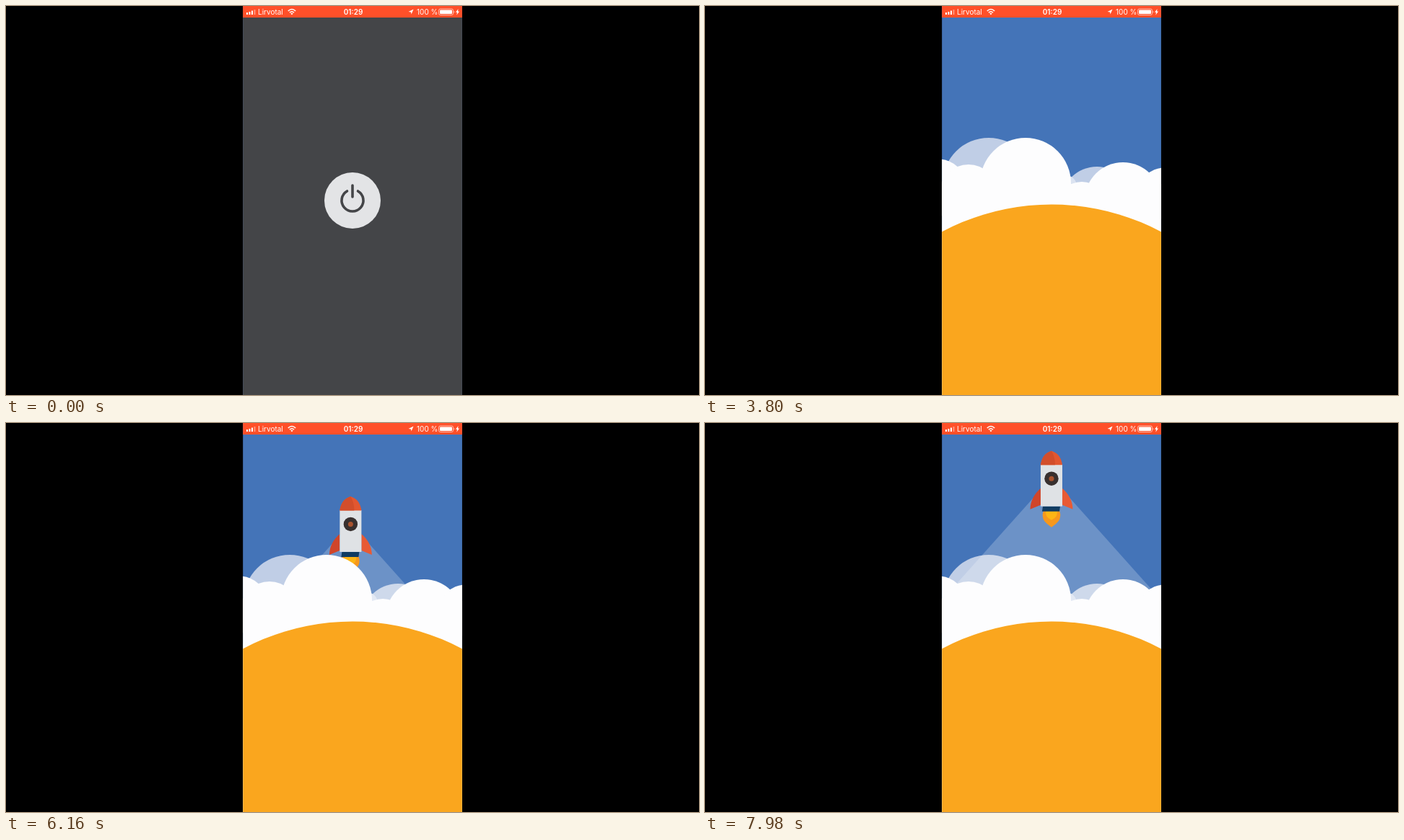
Recreate the animation shown at these times as an HTML page. Size 960x540 px, loop 8000 ms.

```html
<!DOCTYPE html>
<html lang="en">
<head>
<meta charset="utf-8">
<title>Rocket launch</title>
<style>
  html, body { margin: 0; width: 100%; height: 100%; overflow: hidden; background: #000; }
  svg { display: block; width: 100vw; height: 100vh; }
  text { font: 10px Inter, "Liberation Sans", sans-serif; fill: #fff; }
  .bold { font-weight: 600; }
</style>
</head>
<body>
<svg viewBox="0 0 960 540">
  <defs>
    <clipPath id="screen"><rect x="328.200" width="303.700" height="540"/></clipPath>
  </defs>
  <rect width="960" height="540"/>
  <g clip-path="url(#screen)">
    <rect x="328" width="304" height="540" fill="#4474b8"/>
    <rect id="night" x="328" width="304" height="540" fill="#444548"/>

    <g id="backClouds">
      <g fill="#c0cee6"><circle cx="393" cy="247" r="64"/><circle cx="543" cy="273" r="50"/></g>
      <circle cx="500" cy="250" r="15" fill="#dbe3f1"/>
    </g>

    <g id="rocket">
      <path d="M0 37L448 539H-448Z" fill="#fff" opacity=".21"/>
      <path d="M-11 83Q-14 91 -10 97Q-7 101 0 106Q7 101 10 97Q14 91 11 83Z" fill="#f7981d"/>
      <path d="M-8 83Q-9 92 0 96Q9 92 8 83Z" fill="#fdb515"/>
      <path d="M-12 77H12L11 84H-13Z" fill="#103c62"/>
      <path d="M-15 52Q-29 64 -29.500 81L-15 75Z" fill="#d0452a"/>
      <path d="M15 52Q29 64 29.500 81L15 75Z" fill="#e85a34"/>
      <rect x="-15" y="19" width="30" height="58" fill="#dfe2e5"/>
      <path d="M-15 19.500Q-13 4 0 0Q13 4 15 19.500Z" fill="#e25730"/>
      <path d="M-15 19.500Q-13 4 0 0Q5 8 5 19.500Z" fill="#d24e2b"/>
      <circle cy="38.500" r="9.700" fill="#38302f"/>
      <circle cy="38.500" r="3.500" fill="#a9532f"/>
    </g>

    <g id="frontClouds" fill="#fdfdfe">
      <circle cx="323" cy="252" r="39.500"/>
      <circle cx="365" cy="260" r="40"/>
      <circle cx="444" cy="246" r="63"/>
      <circle cx="522" cy="278" r="34"/>
      <circle cx="579" cy="270" r="53"/>
      <circle cx="636" cy="260" r="35.500"/>
      <rect x="328" y="247" width="304" height="293"/>
    </g>
    <circle id="hill" cx="480" cy="598.500" r="323" fill="#faa61e"/>

    <g id="button">
      <circle r="39" fill="#e3e4e6"/>
      <path d="M-7.500 -13A15 15 0 1 0 7.500 -13M0 -21V-5" fill="none" stroke="#444548" stroke-width="3.600" stroke-linecap="round"/>
    </g>

    <rect x="328" width="304" height="16" fill="#ff5029"/>
    <g fill="#fff">
      <path d="M333 9h2v3h-2zM336.500 8h2v4h-2zM340 6.500h2v5.500h-2z"/>
      <path d="M343.500 5h2v7h-2z" opacity=".4"/>
      <text x="349" y="12">Lirvotal</text>
      <path d="M390.800 7Q396 2 401.200 7M393 9.200Q396 6.300 399 9.200" fill="none" stroke="#fff" stroke-width="1.600"/>
      <path d="M394.300 10.500Q396 9 397.700 10.500L396 12.300Z"/>
      <text class="bold" x="481" y="12" text-anchor="middle">01:29</text>
      <path d="M557.500 8L564.500 4.500L561.500 11.500L561 8.500Z"/>
      <text x="569" y="12">100 %</text>
      <rect x="599.500" y="4" width="20" height="8.500" rx="2.200" fill="none" stroke="#fff" stroke-opacity=".6"/>
      <rect x="601" y="5.500" width="17" height="5.500" rx="1"/>
      <path d="M620.700 6.700q1.600 1.500 0 3zM626.500 4L623 8.800H625L624.300 12.500L628 7.500H626Z"/>
    </g>
  </g>
</svg>
<script>
  const LOOP = 8000;
  const part = id => document.getElementById(id);
  const progress = (t, from, to) => Math.min(1, Math.max(0, (t - from) / (to - from)));
  const easeOut = p => 1 - (1 - p) ** 3;
  const place = (id, x, y, scale = 1) =>
    part(id).setAttribute("transform", `translate(${x} ${y}) scale(${scale})`);
  const fade = (id, value) => part(id).setAttribute("opacity", value);

  // Time in ms and height of the rocket's nose
  const climb = [[3400, 232], [4940, 161.5], [6160, 102], [6900, 67], [7980, 38.7], [8600, 31]];

  function slope(i) {
    const a = climb[Math.max(0, i - 1)], b = climb[Math.min(climb.length - 1, i + 1)];
    return (b[1] - a[1]) / (b[0] - a[0]);
  }

  function noseAt(t) {
    const i = Math.max(0, climb.findIndex(k => k[0] > t) - 1);
    const [t0, y0] = climb[i], [t1, y1] = climb[i + 1];
    const span = t1 - t0, p = progress(t, t0, t1), q = 1 - p;
    return q * q * (1 + 2 * p) * y0 + p * p * (3 - 2 * p) * y1
      + span * p * q * (q * slope(i) - p * slope(i + 1));
  }

  function draw(t) {
    fade("night", 1 - progress(t, 1150, 1500));
    const press = progress(t, 1100, 1350);
    place("button", 480, 270, 1 - press);
    fade("button", 1 - press);

    place("hill", 0, 270 * (1 - easeOut(progress(t, 1150, 1620))));
    place("frontClouds", 0, 360 * (1 - easeOut(progress(t, 1300, 2000))));
    place("backClouds", 0, 360 * (1 - easeOut(progress(t, 1400, 2200))));

    const nose = noseAt(t);
    place("rocket", 480 - (nose - 38) * 0.041, nose);
    fade("rocket", t < climb[0][0] ? 0 : 1);
  }

  const start = performance.now();
  function tick() {
    draw((performance.now() - start) % LOOP);
    requestAnimationFrame(tick);
  }
  tick();
</script>
</body>
</html>
```
